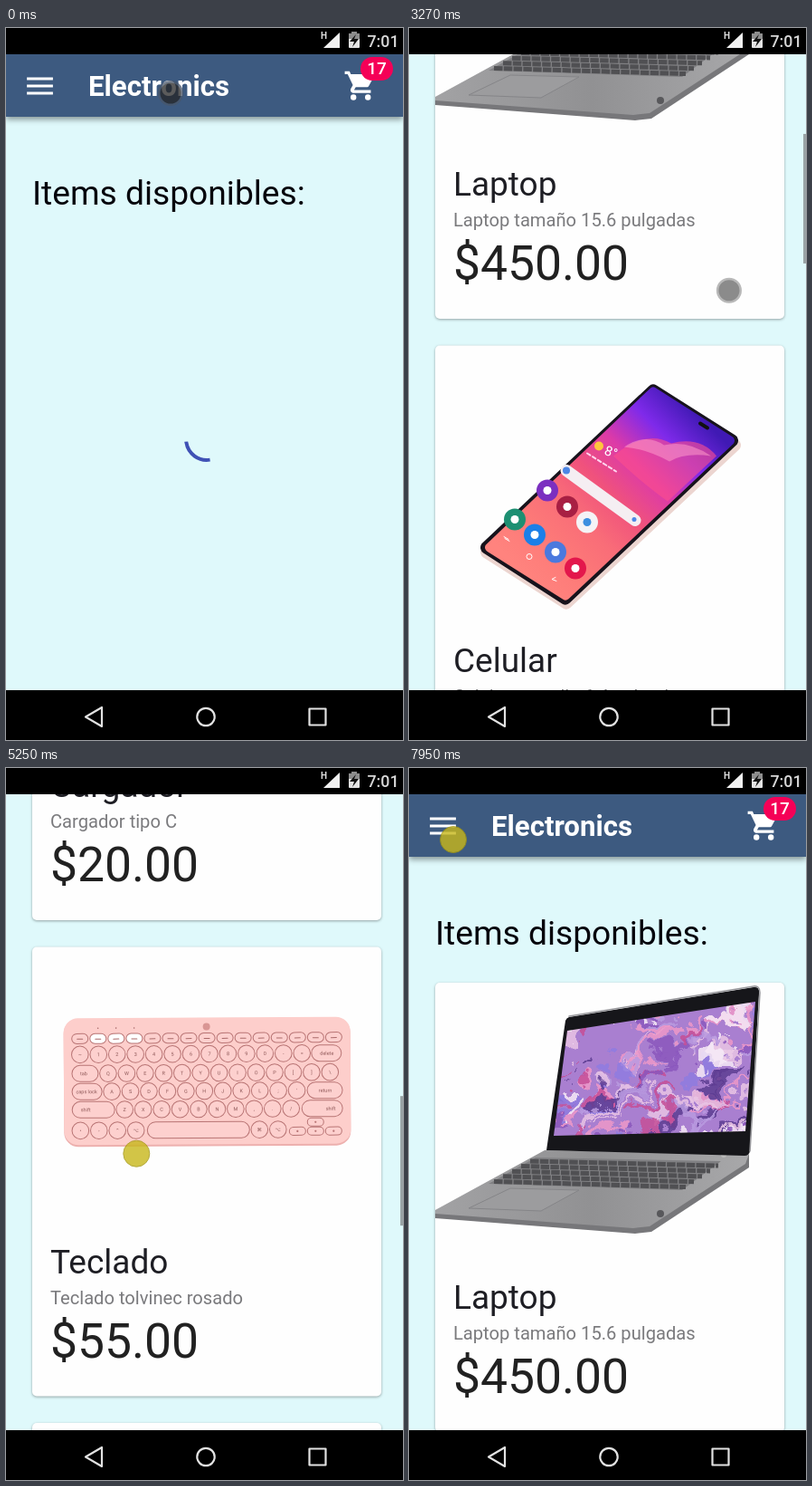
An HTML page for the animation above (8 s loop, 439 px wide and 786 px high).

```html
<!DOCTYPE html>
<html lang="es">
<head>
<meta charset="utf-8">
<title>Electronics</title>
<style>
  html, body { margin: 0; width: 100%; height: 100%; overflow: hidden; background: #dff9fb; }
  #stage { display: block; width: 439px; height: 786px; font-family: Roboto, sans-serif; }
  .card { fill: #fefefe; filter: drop-shadow(0 1.5px 1.5px rgba(0, 0, 0, .35)); }
  .bar { filter: drop-shadow(0 3px 3px rgba(0, 0, 0, .4)); }
  .title { font-size: 37px; fill: #1e1e24; }
  .detail { font-size: 20.15px; fill: #7a7a7d; }
  .price { font-size: 53.4px; fill: #212121; }
  .keys { fill: #fdd0ce; stroke: #b87474; stroke-width: 1; }
  .label { font-size: 5.5px; fill: #8d5656; text-anchor: middle; stroke: none; }
</style>
</head>
<body>
<svg id="stage" viewBox="0 0 439 786"></svg>
<script>
const LOOP = 8000, CARD_TOP = 237, CARD_STEP = 525.5;

let seed = 7;
const random = () => (seed = (seed * 16807) % 2147483647) / 2147483647;
const between = (a, b) => a + (b - a) * random();
const repeat = (n, draw) => Array.from({ length: n }, (_, i) => draw(i)).join('');
const poly = (points, fill, extra = '') => `<polygon points="${points}" fill="${fill}" ${extra}/>`;
const circle = (x, y, r, fill, extra = '') => `<circle cx="${x}" cy="${y}" r="${r}" fill="${fill}" ${extra}/>`;
const ellipse = (x, y, rx, ry, fill, turn = 0, extra = '') =>
  `<ellipse cx="${x}" cy="${y}" rx="${rx}" ry="${ry}" fill="${fill}" transform="rotate(${turn} ${x} ${y})" ${extra}/>`;
const rect = (x, y, w, h, r, fill, extra = '') =>
  `<rect x="${x}" y="${y}" width="${w}" height="${h}" rx="${r}" fill="${fill}" ${extra}/>`;
const path = (d, fill, extra = '') => `<path d="${d}" fill="${fill}" ${extra}/>`;
const line = (d, color, width, extra = '') =>
  path(d, 'none', `stroke="${color}" stroke-width="${width}" stroke-linecap="round" ${extra}`);
const text = (x, y, cls, s, extra = '') => `<text x="${x}" y="${y}" class="${cls}" ${extra}>${s}</text>`;
const gradient = (id, dir, ...colors) => `<linearGradient id="${id}" ${dir}>` +
  colors.map((c, i) => `<stop offset="${i / (colors.length - 1)}" stop-color="${c}"/>`).join('') + '</linearGradient>';

function laptop() {
  const paints = ['#f6e9f6', '#8b57bd', '#ee98c8', '#5d3d92', '#b99ae0', '#c64f97', '#e9c4e4', '#8f7be0'];
  const marble = repeat(110, i => {
    const x = between(145, 395), y = between(5, 180);
    return ellipse(x, y, between(8, 26), between(2, 8), paints[i % 8], between(-70, 20), 'opacity=".85"');
  });
  const keyRow = i => line(`M${134 - i * 10} ${197 + i * 5.6}L${342 - i * 9} ${202 + i * 5.9}`,
    '#505053', 5, 'stroke-dasharray="9.5 1.3" style="stroke-linecap:butt"');
  return poly('29,252 150,186 376,190 376,204 268,275 250,277 29,260', '#77777a')
    + poly('29,251 150,185 376,189 372,200 266,269 248,271 29,255', 'url(#metal)')
    + poly('140,193 345,197 302,229 88,222', '#808083') + repeat(5, keyRow)
    + poly('112,227 188,229 146,252 66,249', '#9c9c9e', 'stroke="#858588"')
    + circle(278, 255, 4, '#58585b') + circle(348, 190, 3, '#bbb')
    + path('M177 38L381 5Q388 4 387 12L377 186Q376 191 371 191L152 185L173 42Q174 39 177 38Z', '#16161a')
    + line('M177 37L381 4Q388 3 388 11L377 186', '#98989c', 1.6)
    + `<clipPath id="display"><path d="M175 53L383 21L372 164L160 169Z"/></clipPath>`
    + `<g clip-path="url(#display)"><g filter="url(#swirl)">${rect(120, -10, 300, 220, 0, '#a97fd0')}${marble}</g></g>`;
}

function phone() {
  const apps = [[117, 192, '#1d8f72'], [139, 209, '#1b7fe8'], [162, 228, '#4b79de'], [184, 246, '#e3174c'],
    [153, 160, '#7b2fc0'], [175, 178, '#a81f43'], [197, 195, '#f5f3f6']];
  const round = 'stroke-linejoin="round" stroke-width="14" stroke=';
  return poly('272,53 360,110 174,284 86,228', '#ecd5d0', round + '"#ecd5d0"')
    + poly('270,50 357,105 173,279 86,223', '#17131c', round + '"#17131c"')
    + poly('270,51 355,105 173,276 89,223', 'url(#wallpaper)', 'stroke="url(#wallpaper)" stroke-width="10" stroke-linejoin="round"')
    + path('M226 122Q262 92 290 108Q322 100 340 122L286 172Q258 152 226 122Z', '#ff4f8c', 'opacity=".6"')
    + path('M238 112Q262 96 282 110Q308 104 334 122Q305 118 288 128Q262 114 238 112Z', '#ff9ccb', 'opacity=".55"')
    + line('M174 138L250 193', '#f5eef2', 13)
    + circle(174, 138, 4, '#4d87e6') + circle(249, 192, 2.5, '#4d87e6')
    + circle(210, 111, 5, '#ffc53d')
    + text(215, 120, '', '8°', 'font-size="15" fill="#fff" transform="rotate(20 215 120)"')
    + line('M197 119L229 139', '#ffd5ee', 2, 'stroke-dasharray="4 3"')
    + apps.map(([x, y, c]) => circle(x, y, 12, c) + circle(x, y, 4.5, c === '#f5f3f6' ? '#3d8fe0' : '#fff')).join('')
    + line('M322 86l8 5', '#111', 4)
    + circle(133, 233, 3, 'none', 'stroke="#fff"') + line('M105 211l5 3m-4 -1l5 3M162 256l-4 2l5 2', '#fff', 1);
}

function charger() {
  const print = (y, s) => text(297, y, '', s, 'font-size="8" text-anchor="middle" fill="#969696"');
  return rect(49, 92, 128, 165, 9, '#efefef') + rect(49, 240, 128, 5, 0, '#c1c1c3') + rect(49, 245, 128, 12, 0, '#d1d1d3')
    + rect(49, 256, 128, 2, 0, '#aaaaae') + ellipse(113, 168, 20, 8, '#c8c8ca')
    + rect(208, 92, 178, 194, 20, '#d8d8d8') + rect(211, 92, 171, 187, 18, '#e8e8e8')
    + rect(264, 230, 8, 28, 3, '#222') + rect(319, 230, 8, 28, 3, '#222')
    + path('M277 242l8 -8l8 8v10h-16z', 'none', 'stroke="#999"') + rect(298, 235, 14, 16, 0, 'none', 'stroke="#999"')
    + circle(346, 241, 9, 'none', 'stroke="#999" stroke-width="2"') + ellipse(346, 266, 12, 8, 'none', 0, 'stroke="#999"')
    + print(257, '100-240VAC 50/60Hz') + print(267, '5V/3A 9V/2A 12V/1.5A') + print(276, 'MADE FOR TYPE C');
}

function keyboard() {
  const pill = (x1, x2, y, h = 18) => rect(x1, y - h / 2, x2 - x1, h, h / 2, '#fdd0ce');
  const row = (x, y, labels) => [...labels].map((s, i) =>
    circle(x + i * 20.45, y, 9.3, '#fdd0ce') + text(x + i * 20.45, y + 2, 'label', s)).join('');
  const topRow = repeat(15, i => rect(73 + i * 20.05, 95, 18, 11, 5.5, i > 0 && i < 4 ? '#fff' : '#fdd0ce')
    + line(`M${79 + i * 20.05} 101h6`, '#a96969', 1));
  return '<g transform="rotate(-.35 222 148)">'
    + rect(64, 79, 317, 141, 16, '#edb0ae') + rect(64, 78, 317, 140, 16, '#fdcecb') + circle(222, 88, 4, '#d99694')
    + repeat(3, i => circle(102 + i * 20, 89, .8, '#a96969'))
    + `<g class="keys">${topRow}`
    + row(82, 118, '~1234567890-=') + pill(338, 371, 118)
    + pill(73, 102, 139) + row(113, 139, 'QWERTYUIOP[]\\')
    + pill(73, 106, 159) + row(117, 159, "ASDFGHJKL;'") + pill(333, 372, 159)
    + pill(73, 120, 179) + row(131, 179, 'ZXCVBNM,./') + pill(327, 372, 179)
    + row(82, 202, '•◦⌃⌥') + pill(156, 269, 202) + row(280, 202, '⌘⌥')
    + [[322, 204], [342, 194], [342, 204], [362, 204]].map(([x, y]) =>
      pill(x - 9, x + 9, y, 9) + circle(x, y, .6, '#a96969')).join('')
    + [[355, 118, 'delete'], [86, 139, 'tab'], [89, 159, 'caps lock'], [353, 159, 'return'], [88, 179, 'shift'], [359, 179, 'shift']]
      .map(([x, y, s]) => text(x, y + 2, 'label', s)).join('') + '</g></g>';
}

function earbuds() {
  return path('M117 53Q119 37 138 39Q198 51 200 87Q200 107 186 108Q125 90 117 53Z', '#ee9da6')
    + path('M123 54Q124 43 139 45Q191 56 195 88Q195 101 184 102Q131 84 123 54Z', '#f6b4ba')
    + path('M88 112Q89 94 109 88L132 86Q174 99 183 116L182 140Q165 167 134 162Q93 148 88 112Z', '#f1a2ac')
    + path('M89 111Q91 93 116 89Q167 92 182 117Q174 139 145 141Q104 136 89 111Z', '#f9c1c7')
    + ellipse(106, 106, 15, 11, '#995660', 20) + ellipse(152, 123, 18, 12, '#995660', 20)
    + ellipse(112, 97, 15, 11, '#f2a9b1') + ellipse(156, 114, 17, 12, '#f2a9b1')
    + line('M112 119l20 7', '#fff', 4, 'stroke-dasharray="2 4"')
    + line('M92 126Q106 151 137 158', '#fcd4d8', 3)
    + ellipse(37, 163, 16, 12, '#f0a1aa', 20) + ellipse(63, 157, 18, 16, '#f3abb4') + ellipse(66, 150, 12, 7, '#fbd0d5')
    + ellipse(106, 172, 11, 10, '#ec9ba5') + ellipse(102, 191, 17, 22, '#f2a8b1', -15)
    + ellipse(98, 194, 11, 17, '#fbe0e2', -18, 'stroke="#d3868f"')
    + path('M242 160Q243 136 276 120Q314 104 350 107Q380 110 380 138L379 170Q372 188 342 203Q300 224 268 223Q247 218 243 189Z', '#19191b')
    + path('M246 156Q250 136 285 119Q318 107 352 111Q376 116 375 135Q360 163 292 179Q253 179 246 156Z', 'url(#gloss)')
    + line('M249 172Q268 188 301 183Q357 169 377 147', '#060607', 2)
    + line('M312 190Q351 177 371 169', '#515157', 2) + line('M322 198L368 182V171', '#08080a', 5)
    + ellipse(406, 198, 19, 18, '#151517') + line('M391 188Q402 180 415 184', '#777', 2) + ellipse(417, 210, 14, 9, '#303034')
    + ellipse(383, 242, 15, 17, '#252527', -15) + line('M374 233Q382 226 389 234', '#666', 2)
    + ellipse(346, 249, 28, 21, '#1b1b1d') + ellipse(340, 255, 20, 14, '#141419', 6, 'stroke="#3059b8" stroke-width="2"');
}

function mouse() {
  return poly('270,0 296,0 285,17 264,8', '#b9b9bb') + path('M261 1L289 14L271 41L247 32Z', '#242425')
    + line('M259 36L247 48M219 97V112', '#202021', 7)
    + path('M214 50Q226 36 247 40Q267 49 265 70Q262 85 247 90L229 107L214 102L212 88Q204 68 214 50Z', '#232324')
    + circle(237, 68, 20, '#111112') + circle(237, 68, 16, '#d6d6d8')
    + path('M158 190Q153 125 199 110Q245 105 267 138Q292 212 270 280Q245 313 205 302Q165 280 158 190Z', '#242426')
    + circle(214, 144, 18, '#253c91') + circle(214, 144, 9, '#141416') + line('M170 176Q214 157 269 172', '#0d0d0e', 2);
}

const products = [
  ['Laptop', 'Laptop tamaño 15.6 pulgadas', '$450.00', laptop],
  ['Celular', 'Celular pantalla 6.4 pulgadas', '$300.00', phone],
  ['Cargador', 'Cargador tipo C', '$20.00', charger],
  ['Teclado', 'Teclado tolvinec rosado', '$55.00', keyboard],
  ['Audífonos', 'Audífonos por bluetooth', '$50.00', earbuds],
  ['Mouse', 'Mouse con cable retráctil', '$15.00', mouse],
];
const productCard = ([title, detail, price, art], i) => `<g transform="translate(0 ${CARD_TOP + i * CARD_STEP})">
  ${rect(29, 0, 386, 496, 5, '#fefefe', 'class="card"')}
  <svg class="art" x="29" y="0" width="386" height="340" viewBox="29 0 386 340">${art()}</svg>
  ${text(49, 360, 'title', title)}${text(49, 394, 'detail', detail)}${text(49, 453, 'price', price)}</g>`;

const menuIcon = 'M3 18h18v-2H3v2zm0-5h18v-2H3v2zm0-7v2h18V6H3z';
const cartIcon = 'M7 18a2 2 0 1 0 0 4a2 2 0 0 0 0-4zM1 2v2h2l3.6 7.6-1.4 2.4C4.5 15.4 5.5 17 7 17h12v-2H7.4l1.2-2h7.4c.8 0 1.4-.4 1.7-1L21.3 5.5C21.7 4.8 21.2 4 20.4 4H5.2l-.9-2zM17 18a2 2 0 1 0 0 4a2 2 0 0 0 0-4z';
const stage = document.getElementById('stage');
stage.innerHTML = `<defs>
  ${gradient('metal', 'x1="0" x2="1"', '#a2a2a4', '#919193', '#a8a8aa')}
  ${gradient('gloss', 'x1="0" y1="1" x2="1" y2="0"', '#222224', '#2b2b2e', '#3b3b3f')}
  ${gradient('wallpaper', 'gradientUnits="userSpaceOnUse" x1="316" y1="72" x2="130" y2="255"',
    '#4019b4', '#7f2aea', '#dc3aa8', '#f0527c', '#f96d78', '#fd7a78', '#ff837e')}
  <filter id="swirl" x="0" y="0" width="1" height="1">
    <feTurbulence type="turbulence" baseFrequency=".022" numOctaves="3" seed="4"/>
    <feDisplacementMap in="SourceGraphic" scale="60" xChannelSelector="R" yChannelSelector="G"/>
  </filter>
  </defs>
  ${rect(0, 0, 439, 786, 0, '#dff9fb')}
  <g id="page">
    ${rect(0, 29, 439, 69, 0, '#3d5a80', 'class="bar"')}
    ${path(menuIcon, '#fff', 'transform="translate(18.3 44.8) scale(1.6)"')}
    ${text(91, 75, '', 'Electronics', 'font-size="31.2" font-weight="700" fill="#fff"')}
    ${path(cartIcon, '#fff', 'transform="translate(373 44.5) scale(1.6)"')}
    ${rect(392, 32, 36, 26, 13, '#f50057')}
    ${text(410, 51, '', '17', 'font-size="19" font-weight="500" fill="#fff" text-anchor="middle"')}
    ${text(29, 195, '', 'Items disponibles:', 'font-size="37.2" fill="#05050c"')}
    <g id="cards">${products.map(productCard).join('')}</g>
  </g>
  <circle id="spinner" cx="222" cy="454" r="22.9" fill="none" stroke="#3f51b5" stroke-width="4"/>
  ${rect(436, 0, 3, 143, 0, '#9aa3a5', 'id="scrollbar"')}
  ${rect(0, 0, 439, 29, 0, '#000')}${rect(0, 731, 439, 55, 0, '#000')}
  ${text(348, 12, '', 'H', 'font-size="10" font-weight="700" fill="#ddd"')}
  ${poly('369,5 369,22 351,22', '#f1f1f1')}
  ${rect(379, 6, 12, 16, 1, '#e4e4e4')}${rect(379, 6, 12, 6, 0, '#8d8d8d')}${rect(382, 4, 6, 3, 0, '#8d8d8d')}
  ${poly('387,7 380,15 385,15 383,21 390,12 385,12', '#111')}
  ${text(399.5, 20.5, '', '7:01', 'font-size="17.8" font-weight="500" fill="#d8d8d8"')}
  <g fill="none" stroke="#e2e2e2" stroke-width="2.2" stroke-linejoin="round">
    <path d="M88 760.5L106 750V771Z"/><circle cx="221" cy="760.5" r="9.7"/><rect x="335.5" y="751.5" width="18" height="18"/>
  </g>
  <g id="touch">${circle(0, 0, 12.8, '#858585', 'stroke="#b5b5b5" stroke-width="2.5"')}</g>
  <g id="mouse">${circle(0, 0, 14.5, '#c8b71a', 'opacity=".8" stroke="#a0940f"')}
    <path id="arrow" d="M1 1V16L4.5 13L7 18.5L9.5 17.5L7 12H12Z" fill="#fff" stroke="#222"/></g>`;

// time, offset, power of the ease-out leading to it
const scrollKeys = [[0, 0, 1], [2950, 0, 1], [3140, 114, 1], [3270, 410, 1], [3320, 524, 1], [3720, 1651, 1.3], [3860, 1823, 1],
  [3990, 1982, 1], [4380, 2276, 2], [4450, 2276, 1], [5050, 1750, 1], [5700, 1493, 2], [6050, 1493, 1],
  [6500, 1090, 1], [7300, 0, 1.5], [LOOP, 0, 1]];
// time, x, y, what is shown from then on
const pointerKeys = [[0, 182, 72, 'touch'], [130, 182, 72, 'mouse'], [200, 348, 405, 'mouse'], [340, 415, 578, ''],
  [2390, 400, 763, 'mouse'], [2950, 385, 704, 'touch'], [3140, 375, 590, 'touch'], [3270, 354, 292, 'touch'],
  [3320, 350, 180, 'mouse'], [3720, 347, 560, 'touch'], [3860, 347, 388, 'touch'], [3990, 330, 230, 'mouse'],
  [4380, 106, 95, 'touch'], [4450, 106, 95, 'touch'], [5050, 150, 620, 'mouse'], [5650, 133, 40, 'mouse'],
  [5790, 133, 19, 'mouse'], [6050, 120, 90, 'touch'], [6500, 180, 493, 'mouse'], [7420, 180, 493, 'mouse'],
  [7900, 49, 79, 'mouse'], [LOOP, 49, 79, 'mouse']];

const clamp = v => Math.max(0, Math.min(1, v));
const mix = (a, b, p) => a + (b - a) * p;
const smooth = p => p * p * (3 - 2 * p);
const byId = id => document.getElementById(id);
const show = (node, visible) => node.setAttribute('visibility', visible ? 'visible' : 'hidden');
const [page, cards, spinner, scrollbar, touch, mouseNode, arrow] =
  ['page', 'cards', 'spinner', 'scrollbar', 'touch', 'mouse', 'arrow'].map(byId);
const arts = [...document.querySelectorAll('.art')];

function segment(keys, t) {
  const i = Math.max(1, keys.findIndex(k => k[0] > t));
  const a = keys[i - 1], b = keys[i];
  return [a, b, (t - a[0]) / (b[0] - a[0])];
}

function drawSpinner(t) {
  const p = (t / 1400 + .187) % 1, growing = p < .5;
  const e = smooth(growing ? p * 2 : p * 2 - 1);
  const start = growing ? 15 * e : 15 + 110 * e;
  const length = Math.min(growing ? 1 + 99 * e : 100, 126.9 - start);
  const unit = 22.9 / 20.2;
  spinner.setAttribute('stroke-dasharray', `${length * unit} 400`);
  spinner.setAttribute('transform', `rotate(${p * 360 + start / 126.9 * 360} 222 454)`);
}

function drawScroll(t) {
  const [a, b, p] = segment(scrollKeys, t);
  const offset = Math.round(mix(a[1], b[1], 1 - (1 - p) ** b[2]));
  page.setAttribute('transform', `translate(0 ${-offset})`);
  scrollbar.setAttribute('y', 33 + offset * .2037);
  scrollbar.setAttribute('opacity', t < 2950 ? 0 : clamp((7850 - t) / 250));
}

function drawPointer(t) {
  const [a, b, p] = segment(pointerKeys, t);
  const x = mix(a[1], b[1], p), y = mix(a[2], b[2], p);
  for (const node of [touch, mouseNode]) {
    show(node, node.id === a[3]);
    node.setAttribute('transform', `translate(${x} ${y})`);
  }
  const releasing = t < 130;
  touch.setAttribute('opacity', releasing ? .75 * (1 - t / 130) : .95);
  touch.firstChild.setAttribute('fill', releasing ? '#242424' : '#858585');
  touch.firstChild.setAttribute('stroke', releasing ? '#48566a' : '#b5b5b5');
  arrow.setAttribute('opacity', y < 29 ? 1 : 0);
}

function frame(now) {
  const t = now % LOOP, loaded = t >= 1770;
  show(spinner, !loaded);
  show(cards, loaded);
  arts.forEach(art => art.setAttribute('opacity', t < 1840 ? 0 : 1));
  drawSpinner(t);
  drawScroll(t);
  drawPointer(t);
  requestAnimationFrame(frame);
}
requestAnimationFrame(frame);
</script>
</body>
</html>
```
